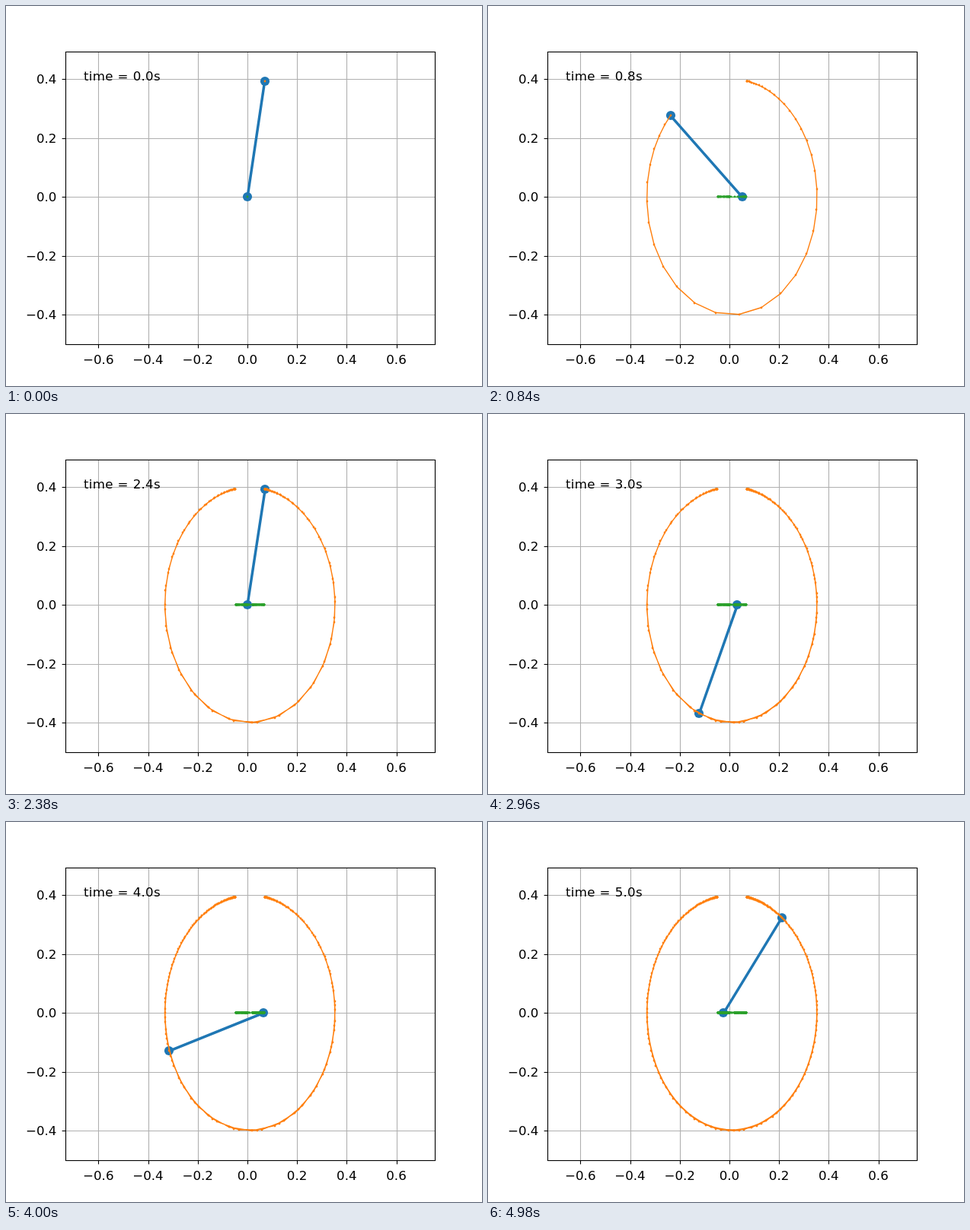
Recreate the animation shown at these times as an HTML page with a canvas. Size 625 by 500 pixels, loop 5 s.

```html
<!DOCTYPE html>
<html lang="en">
<head>
<meta charset="utf-8">
<title>Cart and pendulum</title>
<style>
html, body { margin: 0; width: 100%; height: 100%; overflow: hidden; background: #fff; }
canvas { display: block; }
</style>
</head>
<body>
<canvas id="stage" width="625" height="500"></canvas>
<script>
const ctx = document.getElementById('stage').getContext('2d');
const PT = 100 / 72;
const STEP = 20, COUNT = 250;
const BLUE = '#1f77b4', ORANGE = '#ff7f0e', GREEN = '#2ca02c';

// Uniform rod hinged on a frictionless cart
const G = 9.81, ROD = 0.4, HALF = ROD / 2, START = Math.PI / 18;
const RATIO = 0.2 / 0.7; // rod mass / total mass

function accel(a, w) {
  const s = Math.sin(a), c = Math.cos(a);
  return (G / HALF * s - RATIO * s * c * w * w) / (4 / 3 - RATIO * c * c);
}

function advance(a, w, h) {
  const k1 = accel(a, w);
  const w2 = w + h / 2 * k1, k2 = accel(a + h / 2 * w, w2);
  const w3 = w + h / 2 * k2, k3 = accel(a + h / 2 * w2, w3);
  const w4 = w + h * k3, k4 = accel(a + h * w3, w4);
  return [a + h / 6 * (w + 2 * w2 + 2 * w3 + w4), w + h / 6 * (k1 + 2 * k2 + 2 * k3 + k4)];
}

// Plot area and data limits
const L = 78.125, R = 562.5, T = 60, B = 445;
const reach = ROD - RATIO * HALF;
const mid = RATIO * HALF * Math.sin(START);
const xMin = mid - reach - 0.4, xMax = mid + reach + 0.4;
const yMin = -0.5, yMax = ROD * Math.cos(START) + 0.1;
const px = x => L + (x - xMin) / (xMax - xMin) * (R - L);
const py = y => B - (y - yMin) / (yMax - yMin) * (B - T);
const snap = v => Math.floor(v + 0.5) + 0.5;

const carts = [], tips = [];
let angle = START, speed = 0;
for (let i = 0; i < COUNT; i++) {
  const x = RATIO * HALF * (Math.sin(START) - Math.sin(angle));
  carts.push([px(x), py(0)]);
  tips.push([px(x + ROD * Math.sin(angle)), py(ROD * Math.cos(angle))]);
  for (let k = 0; k < 20; k++) [angle, speed] = advance(angle, speed, STEP / 20000);
}

function line(points, color, width, cap = 'square') {
  ctx.strokeStyle = color;
  ctx.lineWidth = width;
  ctx.lineCap = cap;
  ctx.lineJoin = 'round';
  ctx.beginPath();
  points.forEach(p => ctx.lineTo(p[0], p[1]));
  ctx.stroke();
}

function dots(points, color, radius) {
  ctx.fillStyle = color;
  for (const [x, y] of points) {
    ctx.beginPath();
    ctx.arc(Math.round(x), Math.round(y), radius, 0, 2 * Math.PI);
    ctx.fill();
  }
}

function text(str, x, y, align, spacing = 0) {
  ctx.font = 12 * PT + 'px "DejaVu Sans", sans-serif';
  ctx.fillStyle = '#000';
  ctx.textAlign = align;
  ctx.letterSpacing = spacing + 'px';
  ctx.fillText(str, x, y);
}

const label = v => (v < 0 ? '\u2212' : '') + (Math.abs(v) / 10).toFixed(1);

function axes() {
  const thin = 0.8 * PT, tick = 3.5 * PT;
  const left = snap(L), right = snap(R), top = snap(T), bottom = snap(B);
  for (let v = -6; v <= 6; v += 2) {
    const x = snap(px(v / 10));
    line([[x, top], [x, bottom]], '#b0b0b0', thin, 'butt');
    line([[x, bottom], [x, bottom + tick]], '#000', thin, 'butt');
    text(label(v), px(v / 10) - 0.2, 471, 'center');
  }
  for (let v = -4; v <= 4; v += 2) {
    const y = snap(py(v / 10));
    line([[left, y], [right, y]], '#b0b0b0', thin, 'butt');
    line([[left - tick, y], [left, y]], '#000', thin, 'butt');
    text(label(v), 66.4, Math.round(py(v / 10) + 6), 'right');
  }
}

function frame() {
  ctx.strokeStyle = '#000';
  ctx.lineWidth = 0.8 * PT;
  ctx.lineJoin = 'miter';
  ctx.strokeRect(snap(L), snap(T), snap(R) - snap(L), snap(B) - snap(T));
}

function trail(points, color) {
  line(points, color, PT);
  dots(points, color, PT);
}

function draw(i) {
  ctx.fillStyle = '#fff';
  ctx.fillRect(0, 0, 625, 500);
  axes();
  const rod = [carts[i], tips[i]];
  line(rod, BLUE, 2.5 * PT);
  dots(rod, BLUE, 6.1);
  trail(tips.slice(0, i + 1), ORANGE);
  trail(carts.slice(0, i + 1), GREEN);
  frame();
  text('time = ', 102, 98, 'left', 0.3);
  text((i * STEP / 1000).toFixed(1) + 's', 166.8, 98, 'left', 0.2);
}

const begin = performance.now();
function loop() {
  const t = Math.max(0, performance.now() - begin);
  draw(Math.floor(t / STEP) % COUNT);
  requestAnimationFrame(loop);
}
draw(0);
requestAnimationFrame(loop);
</script>
</body>
</html>
```
